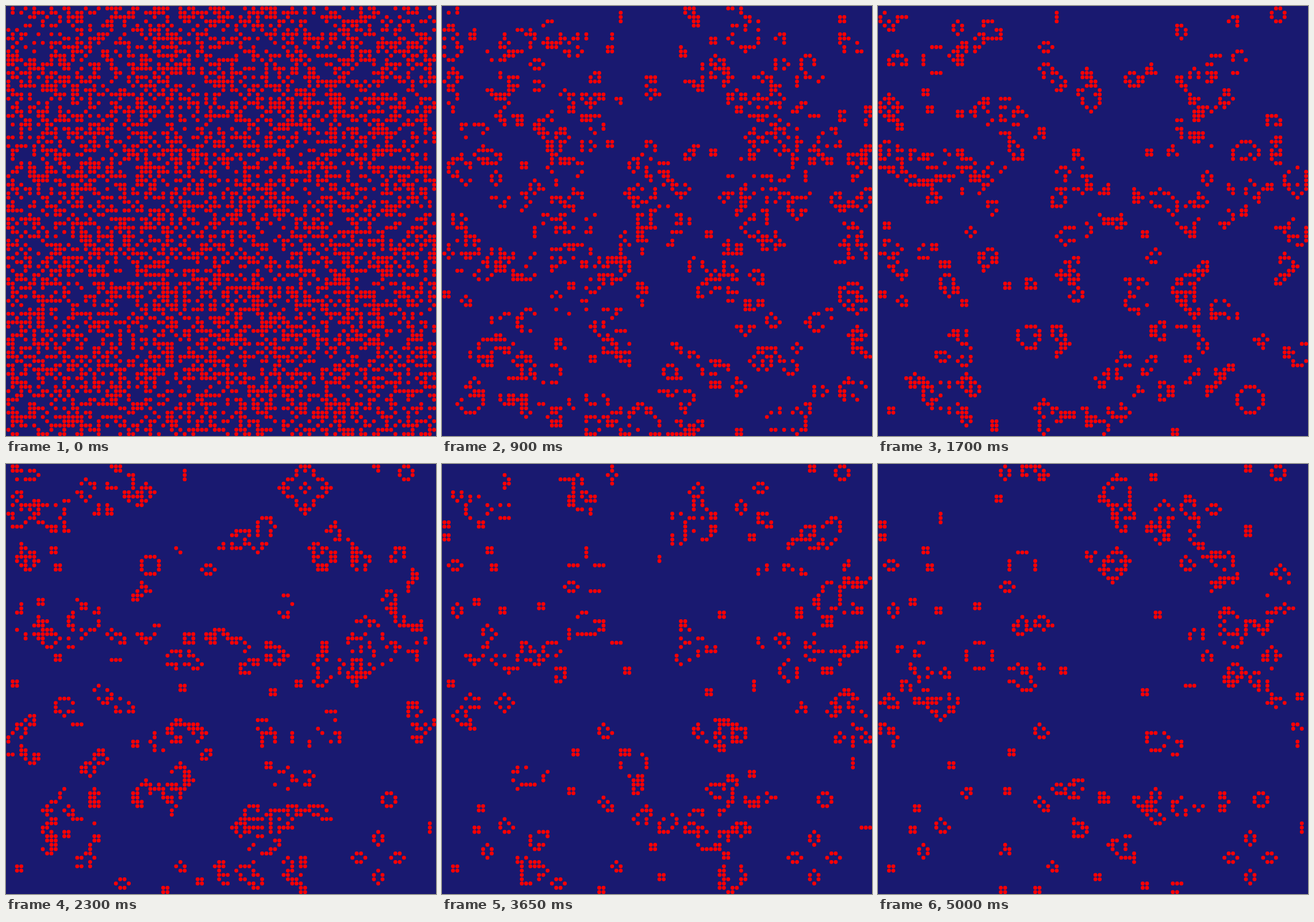
Animation of 748x748 px, one loop 5.05 s. Source, as an HTML page with a canvas:

```html
<!DOCTYPE html>
<html lang="en">
<head>
<meta charset="utf-8">
<title>Game of Life</title>
<style>
  html, body { margin: 0; width: 100%; height: 100%; overflow: hidden; background: #191970; }
  canvas { display: block; }
</style>
</head>
<body>
<canvas id="stage" width="748" height="748"></canvas>
<script>
const STAGE = 748, SIZE = 100, GENERATIONS = 101, STEP_MS = 50;
const PITCH = STAGE / SIZE, ORIGIN = 4.2, RADIUS = 3.4;
const DENSITY = 0.45;

function seededRandom(seed) {
  return () => {
    seed = (seed + 0x6D2B79F5) | 0;
    let t = Math.imul(seed ^ (seed >>> 15), 1 | seed);
    t = (t + Math.imul(t ^ (t >>> 7), 61 | t)) ^ t;
    return ((t ^ (t >>> 14)) >>> 0) / 4294967296;
  };
}

const column = index => index % SIZE;
const row = index => Math.floor(index / SIZE);
const inside = (x, y) => x >= 0 && y >= 0 && x < SIZE && y < SIZE;

function countNeighbours(cells, index) {
  let count = -cells[index];
  for (let dy = -1; dy <= 1; dy++)
    for (let dx = -1; dx <= 1; dx++)
      if (inside(column(index) + dx, row(index) + dy)) count += cells[index + dy * SIZE + dx];
  return count;
}

// Born with three neighbours, survives with two or three; outside the grid all is dead.
function evolve(cells) {
  return cells.map((alive, index) => {
    const neighbours = countNeighbours(cells, index);
    return neighbours === 3 || (alive && neighbours === 2) ? 1 : 0;
  });
}

const random = seededRandom(42);
const history = [Uint8Array.from({ length: SIZE * SIZE }, () => random() < DENSITY ? 1 : 0)];
while (history.length < GENERATIONS) history.push(evolve(history[history.length - 1]));

const ctx = document.getElementById('stage').getContext('2d');

function draw(cells) {
  ctx.fillStyle = '#191970';
  ctx.fillRect(0, 0, STAGE, STAGE);
  ctx.fillStyle = '#ff0000';
  ctx.beginPath();
  cells.forEach((alive, index) => {
    if (!alive) return;
    const x = ORIGIN + PITCH * column(index);
    const y = ORIGIN + PITCH * row(index);
    ctx.moveTo(x + RADIUS, y);
    ctx.arc(x, y, RADIUS, 0, Math.PI * 2);
  });
  ctx.fill();
}

const start = performance.now();
let shown = -1;

function tick() {
  const generation = Math.floor((performance.now() - start) / STEP_MS) % GENERATIONS;
  if (generation !== shown) {
    shown = generation;
    draw(history[generation]);
  }
  requestAnimationFrame(tick);
}
tick();
</script>
</body>
</html>
```
